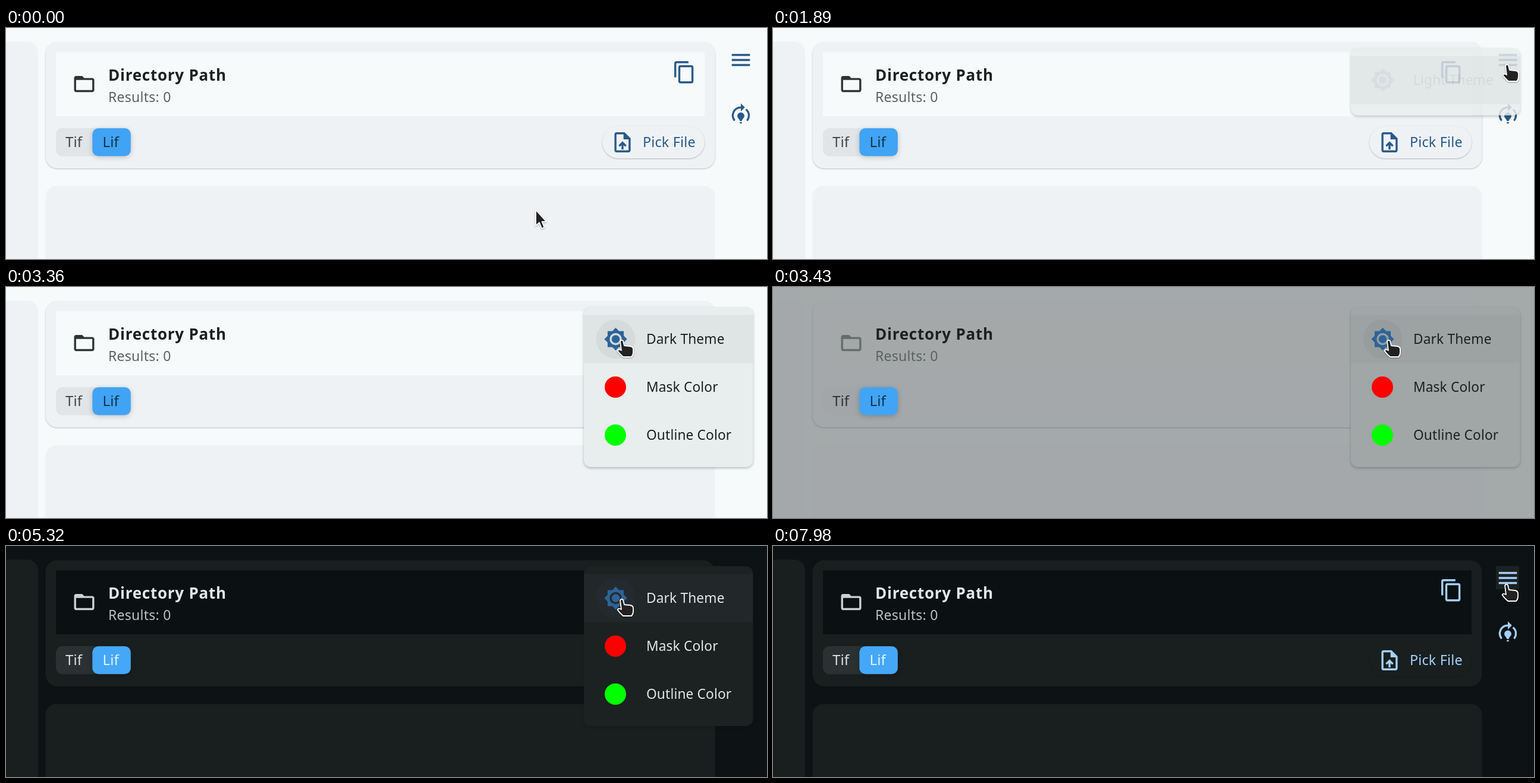
These frames come from a looping animation (1280 by 390 pixels, 8 s). An HTML page:

```html
<!DOCTYPE html>
<html lang="en">
<head>
<meta charset="utf-8">
<title>Theme switch</title>
<style>
  html, body { margin: 0; width: 100%; height: 100%; overflow: hidden; }
  svg { display: block; width: 100%; height: 100%; background: var(--bg); }
  text { font: 500 22.7px "Noto Sans", "Open Sans", sans-serif; fill: var(--text); letter-spacing: .15px; }
  .title { font-size: 26px; font-weight: 600; letter-spacing: .75px; }
  .soft { font-size: 23px; font-weight: 400; fill: var(--soft); letter-spacing: .25px; }
  .toggle { font-size: 24px; fill: var(--toggle); }
  .pick { font-size: 23.4px; }
  .accent { fill: var(--accent); }
  .panel { fill: var(--panel); }
  .raised { filter: drop-shadow(0 1.5px 1px var(--shadow)); }
  #sheet { fill: var(--menu); filter: drop-shadow(0 2px 2px var(--shadow)); }
  #cursor { fill: #222; stroke: #fff; stroke-width: 1.8; stroke-linejoin: round;
            filter: drop-shadow(0 1px 1px #0005); }
</style>
</head>
<body>
<svg viewBox="0 0 1280 390" preserveAspectRatio="none">
  <defs>
    <clipPath id="clip"><rect id="clipBox" y="34" rx="12"/></clipPath>
  </defs>

  <rect class="panel" x="-40" y="23" width="94" height="420" rx="18"/>
  <rect class="panel raised" x="66.5" y="24" width="1126" height="213" rx="20"/>
  <rect class="panel" x="66.5" y="267" width="1126" height="160" rx="18"/>
  <rect x="84" y="41" width="1091" height="108" fill="var(--field)"/>

  <path fill="var(--folder)" data-icon="folder" data-at="131.5 94.6"/>
  <text class="title" x="172" y="89">Directory Path</text>
  <text class="soft" x="172" y="125">Results: 0</text>
  <path class="accent" data-icon="copy" data-at="1141 74.7"/>

  <rect x="84" y="169" width="126" height="47.5" rx="11" fill="var(--track)"/>
  <rect x="145.3" y="169.3" width="64.5" height="47" rx="10" fill="var(--blue)"
        style="filter: drop-shadow(0 2px 4px #0003)"/>
  <text class="toggle" x="100" y="201">Tif</text>
  <text class="toggle" x="162.5" y="201">Lif</text>

  <rect class="panel raised" x="1003" y="166" width="172" height="54" rx="27"/>
  <path class="accent" data-icon="upload" data-at="1037 193"/>
  <text class="accent pick" x="1071" y="201">Pick File</text>

  <rect id="hover" x="1216" y="34" width="39" height="39" fill="var(--menu)"/>
  <path class="accent" data-icon="menu" data-at="1236 54"/>
  <path class="accent" data-icon="training" data-at="1236 146"/>

  <g id="menu">
    <rect id="sheet" y="34" rx="12"/>
    <g clip-path="url(#clip)">
      <rect x="972" y="47" width="284" height="81.5" fill="var(--focus)"/>
      <g class="item">
        <circle id="halo" cx="1025.5" cy="88" r="33" fill="var(--halo)"/>
        <path fill="#2d6498" data-icon="sun" data-at="1025.5 88"/>
        <text id="themeLabel" x="1077" y="96"></text>
      </g>
      <g class="item">
        <circle cx="1025" cy="169" r="18" fill="#f00"/>
        <text x="1077" y="177">Mask Color</text>
      </g>
      <g class="item">
        <circle cx="1025" cy="250" r="18" fill="#0f0"/>
        <text x="1077" y="258">Outline Color</text>
      </g>
    </g>
  </g>
  <path id="cursor"/>
</svg>

<script>
const LOOP = 8000, TICK = 70;
const OPEN = 1806, CLOSE = 6075, MENU_TIME = 300, SWITCH = 3360;

const icons = {
  folder: "M20 6h-8l-2-2H4c-1.1 0-2 .9-2 2v12c0 1.1.9 2 2 2h16c1.1 0 2-.9 2-2V8c0-1.1-.9-2-2-2zm0 12H4V8h16z",
  copy: "M16 1H4c-1.1 0-2 .9-2 2v14h2V3h12zm3 4H8c-1.1 0-2 .9-2 2v14c0 1.1.9 2 2 2h11c1.1 0 2-.9 2-2V7c0-1.1-.9-2-2-2zm0 16H8V7h11z",
  menu: "M3 18h18v-2H3zm0-5h18v-2H3zm0-7v2h18V6z",
  upload: "M14 2H6c-1.1 0-2 .9-2 2v16c0 1.1.9 2 2 2h12c1.1 0 2-.9 2-2V8zm4 18H6V4h7v5h5zM8 15l1.4 1.4 1.6-1.6V19h2v-4.2l1.6 1.6L16 15l-4-4z",
  sun: "M20 15.3L23.3 12 20 8.7V4h-4.7L12 .7 8.7 4H4v4.7L.7 12 4 15.3V20h4.7l3.3 3.3 3.3-3.3H20zM12 18a6 6 0 1 1 0-12 6 6 0 1 1 0 12zM12 8a4 4 0 1 0 0 8 4 4 0 1 0 0-8z",
  training: "M15.5 13.5c0 2-2.5 3.5-2.5 5h-2c0-1.5-2.5-3-2.5-5a3.5 3.5 0 0 1 7 0zM13 19.5h-2V21h2zM19 13c0 1.7-.6 3.2-1.6 4.4l1.4 1.4A9 9 0 0 0 17.8 6.2l-1.4 1.4A7 7 0 0 1 19 13zM16 5l-4-4v3A9 9 0 0 0 5.2 18.8l1.4-1.4A7 7 0 0 1 12 6v3z"
};
const ARROW = "M0 0V27L6 21.5 10 31.5 14.5 29.5 10.5 20H18Z";
const HAND = "M-2 2Q0-2 3 1L5 9 15 10Q20 11 20 15V20Q20 25 17 28H3Q-3 23-6.5 17.5-5 14 0 17Z";

// name: [light, dark, fade delay, fade length], times in ms after the switch
const palette = {
  bg:     ["f6fafb", "0d1314", 0, 200],
  panel:  ["eff2f5", "191e1f", 0, 200],
  field:  ["f6fafb", "0b1112", 0, 200],
  track:  ["e2e5e7", "2b3033", 0, 200],
  blue:   ["40a3f4", "45a7f8", 0, 200],
  menu:   ["e8eded", "1c2122", 0, 200],
  focus:  ["dfe4e4", "222729", 0, 200],
  halo:   ["d5dadb", "242b30", 0, 200],
  shadow: ["00000040", "00000020", 0, 200],
  folder: ["2e3336", "cdd2d0", 0, 200],
  accent: ["2a5a88", "a5d0fa", 0, 200],
  text:   ["1d2021", "e4e7e8", 70, 400],
  soft:   ["5c6163", "bcc0c1", 70, 400],
  toggle: ["000000b3", "ffffffd9", 190, 200]
};

// cursor stops: time, x, y
const stops = [
  [600, 891, 307], [1540, 1234, 62], [2100, 1234, 62], [2590, 1060, 234],
  [2690, 1060, 234], [3010, 1035, 90], [5500, 1035, 90], [6020, 743, 350],
  [6900, 743, 350], [7840, 1233, 65]
];

const $ = id => document.getElementById(id);
const clamp = v => Math.min(1, Math.max(0, v));
const mix = (a, b, p) => a + (b - a) * p;
const ease = p => p * p * (3 - 2 * p);
const setAll = (el, attrs) => {
  for (const name in attrs) el.setAttribute(name, attrs[name]);
};
const rgba = hex => hex.padEnd(8, "f").match(/../g).map(h => parseInt(h, 16));

for (const el of document.querySelectorAll("[data-icon]")) {
  setAll(el, {
    d: icons[el.dataset.icon],
    "fill-rule": "evenodd",
    transform: `translate(${el.dataset.at}) scale(1.7) translate(-12 -12)`
  });
}

function applyTheme(t) {
  for (const name in palette) {
    const [light, dark, delay, length] = palette[name];
    const p = clamp((t - SWITCH - delay) / length);
    const to = rgba(dark);
    const [r, g, b, a] = rgba(light).map((v, i) => mix(v, to[i], p));
    document.documentElement.style.setProperty("--" + name, `rgba(${r},${g},${b},${a / 255})`);
  }
  $("themeLabel").textContent = t < SWITCH ? "Light Theme" : "Dark Theme";
}

function applyMenu(t) {
  const p = clamp((t - OPEN) / MENU_TIME) - clamp((t - CLOSE) / MENU_TIME);
  const unit = 1 / 4.5;
  const width = 284.5 * clamp(p / unit);
  const box = { x: 1256.5 - width, width, height: 270 * clamp(p / (3 * unit)) };
  setAll($("sheet"), box);
  setAll($("clipBox"), box);
  $("menu").setAttribute("opacity", clamp(p * 3));
  document.querySelectorAll(".item").forEach((item, i) =>
    item.setAttribute("opacity", ease(clamp((p - (i + 1) * unit) / (1.5 * unit)))));
}

function cursorAt(t) {
  const next = stops.findIndex(s => s[0] > t);
  if (next === 0) return stops[0].slice(1);
  if (next < 0) return stops.at(-1).slice(1);
  const [t0, x0, y0] = stops[next - 1], [t1, x1, y1] = stops[next];
  const p = ease((t - t0) / (t1 - t0));
  return [mix(x0, x1, p), mix(y0, y1, p)];
}

function applyCursor(t) {
  const [x, y] = cursorAt(t);
  const inside = (l, top, r, b) => x > l && x < r && y > top && y < b;
  const menuOpen = t > OPEN && t < CLOSE;
  const onButton = inside(1214, 34, 1258, 76);
  const onLink = onButton || inside(1003, 166, 1175, 221) ||
    menuOpen && inside(972, 34, 1256, 304);
  setAll($("cursor"), { d: onLink ? HAND : ARROW, transform: `translate(${x} ${y})` });
  $("hover").setAttribute("opacity", +(onButton && !menuOpen));
  $("halo").setAttribute("opacity", +(Math.hypot(x - 1025.5, y - 88) < 33));
}

function frame(now) {
  const t = Math.floor(now % LOOP / TICK) * TICK;
  applyTheme(t);
  applyMenu(t);
  applyCursor(t);
  requestAnimationFrame(frame);
}
frame(performance.now());
</script>
</body>
</html>
```
